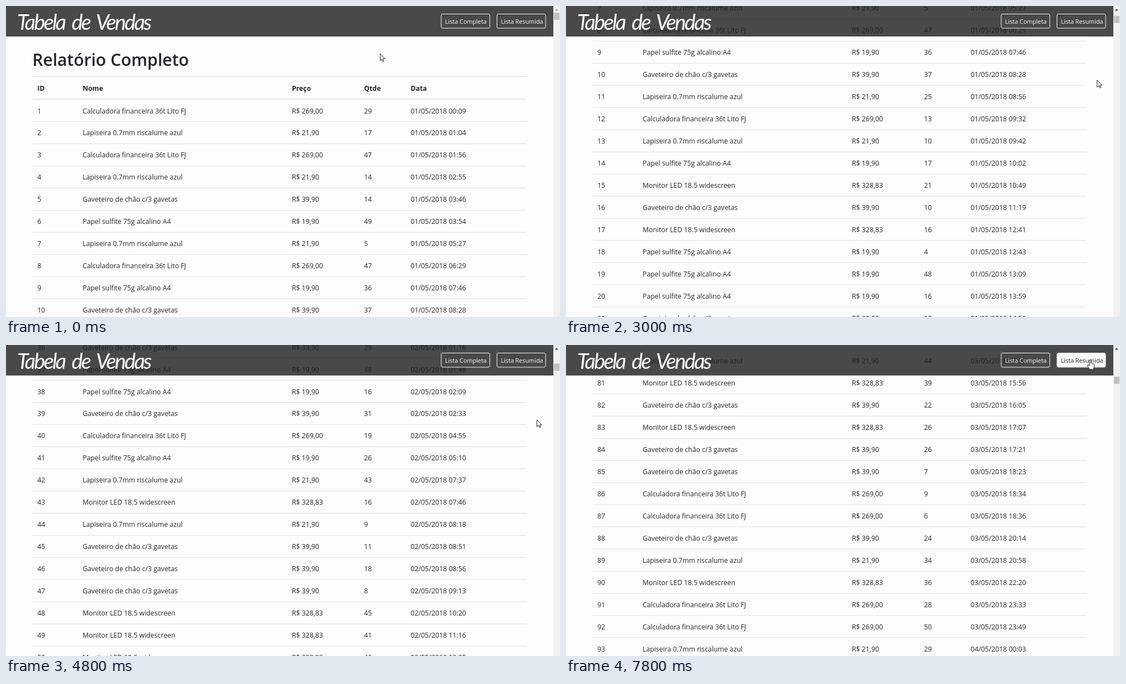
Animation, 998 px wide and 561 px high, one loop 8 s. Source, as an HTML page:

```html
<!DOCTYPE html>
<html lang="pt-BR">
<head>
<meta charset="utf-8">
<title>Tabela de Vendas</title>
<style>
  html, body { margin: 0; width: 100%; height: 100%; overflow: hidden; background: #fdfdfd; }
  svg { display: block; width: 100vw; height: 100vh; }
  text { font: 12.3px "Open Sans", "Noto Sans", sans-serif; fill: #212529; white-space: pre; }
  .heading { font-size: 30.2px; font-weight: 600; }
  .columns text { font-weight: 700; }
  .brand { font: italic 400 38px Lato, sans-serif; letter-spacing: -2.7px; word-spacing: 6px; fill: #fff; }
  .rule { stroke: #dedfdf; }
  .button rect { fill: none; stroke: #f8f9fa; }
  .button text { font-size: 10.8px; fill: #f8f9fa; }
  .button.hover rect { fill: #f8f9fa; }
  .button.hover text { fill: #212529; }
  .pointer { fill: #fff; stroke: #222; stroke-linejoin: round; }
</style>
</head>
<body>
<svg viewBox="0 0 998 561">
  <rect width="998" height="561" fill="#fdfdfd"/>
  <g id="page">
    <text class="heading" x="47.5" y="107.5">Relatório Completo</text>
    <path class="rule" d="M48 127.5H938"/>
    <path class="rule" d="M48 168H938" stroke-width="1.5"/>
    <g id="columns" class="columns"></g>
    <g id="rows"></g>
  </g>

  <rect width="986" height="55" fill="#1d1d1d" fill-opacity=".8"/>
  <text class="brand" x="20" y="42.5">Tabela de Vendas</text>
  <g class="button">
    <rect x="784" y="14.5" width="87.5" height="25.5" rx="2.5"/>
    <text x="791" y="32.3">Lista Completa</text>
  </g>
  <g id="summary" class="button">
    <rect x="884.5" y="14.5" width="87.5" height="25.5" rx="2.5"/>
    <text x="891.5" y="32.3">Lista Resumida</text>
  </g>

  <rect x="986" width="12" height="561" fill="#f1f1f1"/>
  <path id="scrollUp" d="M988.5 8.5L991.7 5L995 8.5Z"/>
  <rect id="thumb" x="987" y="12" width="10" height="13" fill="#c1c1c1"/>

  <path id="arrow" class="pointer" d="M0 0V12.5L2.9 9.8L4.8 14L6.8 13.1L5 9.1H8.7Z"/>
  <path id="hand" class="pointer" d="M-1.3 9V1Q0 -1 1.3 1V6Q2.8 5 3.8 6.5Q5 5.7 5.8 7Q7.5 6.6 7.5 8.5V12L6 17H-.5L-4.5 11Q-5 8.5-3 9L-1.3 11Z"/>
</svg>

<script>
const LOOP = 8000, STEP = 200;
const ROW_HEIGHT = 39.96, FIRST_BASELINE = 193.5;
const COLUMN_X = [56.5, 138, 515, 645, 729];

const products = {
  C: ["Calculadora financeira 36t Lito FJ", "269,00"],
  L: ["Lapiseira 0.7mm riscalume azul", "21,90"],
  G: ["Gaveteiro de chão c/3 gavetas", "39,90"],
  P: ["Papel sulfite 75g alcalino A4", "19,90"],
  M: ["Monitor LED 18.5 widescreen", "328,83"]
};

// Each sale: product letter and quantity, then time of day.
const salesByDay = {
  "01/05/2018": `C29 00:09, L17 01:04, C47 01:56, L14 02:55, G14 03:46, P49 03:54, L5 05:27,
    C47 06:29, P36 07:46, G37 08:28, L25 08:56, C13 09:32, L10 09:42, P17 10:02, M21 10:49,
    G10 11:19, M16 12:41, P4 12:43, P48 13:09, P16 13:59, G10 14:50, P26 15:52, M15 15:59,
    G2 16:15, L31 16:39, P35 16:46, P6 17:02, L22 18:10, M40 19:05, C12 20:21, P33 21:07,
    G8 22:14, L27 22:48, P41 23:36`,
  "02/05/2018": `M19 00:31, G29 01:16, P48 01:48, P16 02:09, G31 02:33, C19 04:55, P26 05:10,
    L43 07:37, M16 07:46, L9 08:18, G11 08:51, G18 08:56, G8 09:13, M45 10:20, M41 11:16,
    M46 12:35, P16 13:13, C17 14:14, G32 14:33, L4 15:59, P6 16:08, L35 16:19, G16 17:41,
    P48 18:17, P24 18:33, C49 20:29, L41 20:51, C33 21:09, P49 21:34`,
  "03/05/2018": `M50 02:00, P13 02:02, L38 02:57, C21 03:40, P11 04:26, M7 05:18, G9 06:21,
    C30 08:31, G22 09:14, M1 09:20, C19 10:39, L44 11:13, L8 11:38, G43 14:05, L49 14:09,
    L50 15:23, L44 15:53, M39 15:56, G22 16:05, M26 17:07, G26 17:21, G7 18:23, C9 18:34,
    C6 18:36, G24 20:14, L34 20:58, M36 22:20, C28 23:33, C50 23:49`,
  "04/05/2018": `L29 00:03, P18 00:52`
};

const byId = id => document.getElementById(id);
const cells = (values, y) =>
  values.map((value, i) => `<text x="${COLUMN_X[i]}" y="${y}">${value}</text>`).join("");

function saleRow([date, sale], index) {
  const [item, time] = sale.trim().split(" ");
  const [name, price] = products[item[0]];
  const y = FIRST_BASELINE + index * ROW_HEIGHT;
  return cells([index + 1, name, "R$ " + price, item.slice(1), `${date} ${time}`], y) +
    `<path class="rule" d="M48 ${y + 15}H938"/>`;
}

byId("columns").innerHTML = cells(["ID", "Nome", "Preço", "Qtde", "Data"], 153);
byId("rows").innerHTML = Object.entries(salesByDay)
  .flatMap(([date, sales]) => sales.split(",").map(sale => [date, sale]))
  .map(saleRow).join("");

// Keys are [time, value], joined by straight segments.
const scrollKeys = [[1200, 0], [2600, 249.5], [3600, 688], [4800, 1583.5],
  [5600, 2191], [6600, 2940], [7200, 3317]];
const pointerX = [[200, 674], [1200, 957], [7200, 956], [7600, 944]];
const pointerY = [[200, 86], [1200, 133], [2600, 133], [3600, 135], [7200, 135], [7600, 27]];

function valueAt(keys, time) {
  const next = keys.findIndex(key => key[0] > time);
  if (next === 0) return keys[0][1];
  if (next < 0) return keys[keys.length - 1][1];
  const [t0, v0] = keys[next - 1], [t1, v1] = keys[next];
  return v0 + (v1 - v0) * (time - t0) / (t1 - t0);
}

function draw(now) {
  const time = Math.floor(now % LOOP / STEP) * STEP;
  const scroll = valueAt(scrollKeys, time);
  const hovering = time >= 7600;
  const move = `translate(${valueAt(pointerX, time)} ${valueAt(pointerY, time)})`;

  byId("page").setAttribute("transform", `translate(0 ${-scroll})`);
  byId("thumb").setAttribute("y", 12 + scroll * 0.0136);
  byId("scrollUp").setAttribute("fill", scroll ? "#505050" : "#a3a3a3");
  byId("summary").classList.toggle("hover", hovering);
  for (const id of ["arrow", "hand"]) {
    byId(id).setAttribute("transform", move);
    byId(id).setAttribute("visibility", (id === "hand") === hovering ? "visible" : "hidden");
  }
  requestAnimationFrame(draw);
}
draw(performance.now());
</script>
</body>
</html>
```
